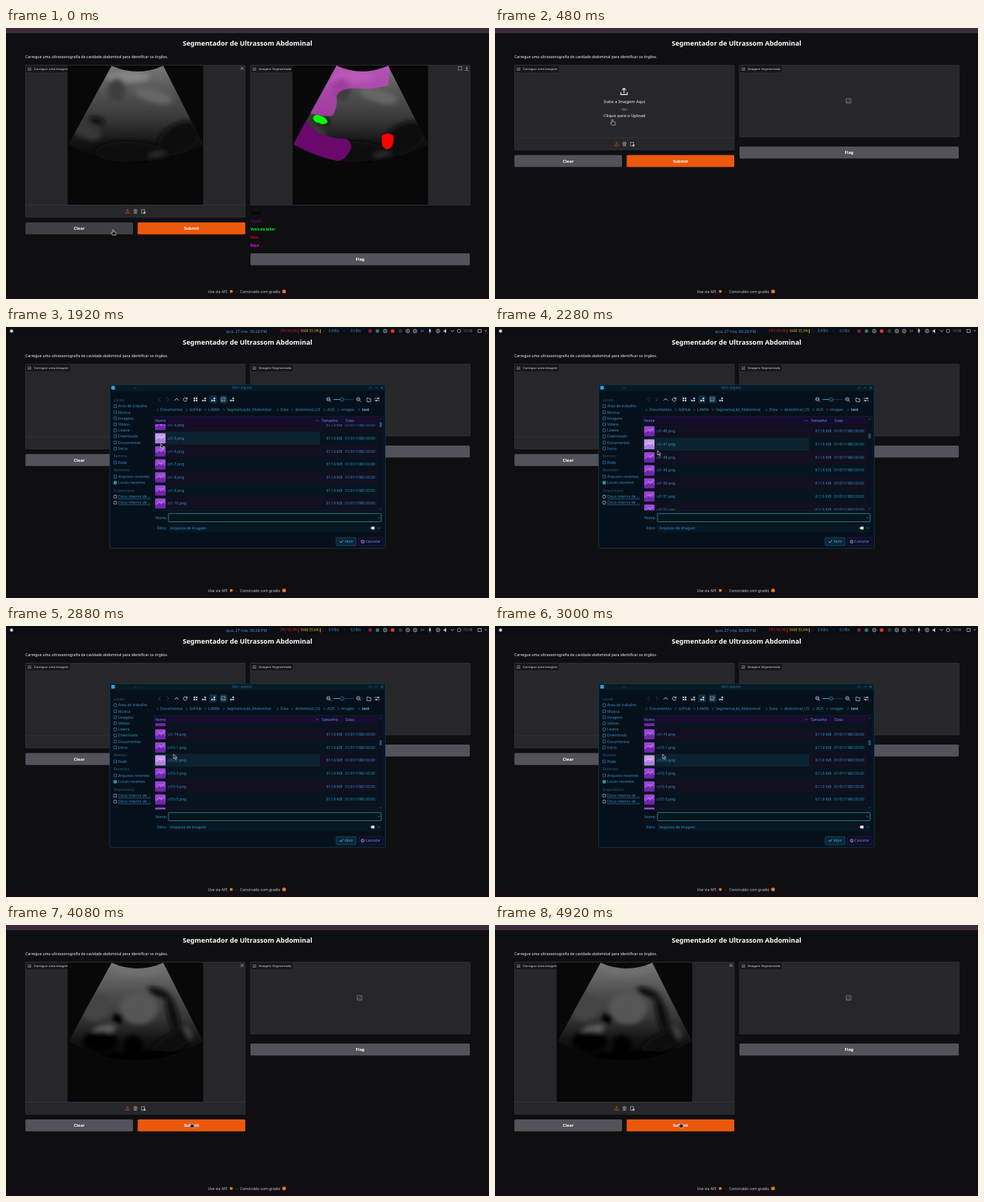
These frames come from a looping animation (654x368 px, 5.4 s). An HTML page:

```html
<!DOCTYPE html>
<html lang="pt">
<head>
<meta charset="utf-8">
<style>
html, body { margin: 0; width: 100%; height: 100%; overflow: hidden; background: #0f0f11; }
svg { display: block; width: 654px; height: 368px; font-family: "Noto Sans", "Open Sans", sans-serif; }
</style>
</head>
<body>
<svg id="stage" viewBox="0 0 654 368"></svg>
<script>
const stage = document.getElementById('stage');
const LOOP = 5400, STEP = 120, PITCH = 17.7;

// y is the middle of the capitals
const text = (x, y, s, size, fill, more = '') =>
  `<text x="${x}" y="${y + size * .36}" font-size="${size}" fill="${fill}" ${more}>${s}</text>`;
const rect = (x, y, w, h, fill, more = '') =>
  `<rect x="${x}" y="${y}" width="${w}" height="${h}" fill="${fill}" ${more}/>`;
const dot = (x, y, r, fill, more = '') => `<circle cx="${x}" cy="${y}" r="${r}" fill="${fill}" ${more}/>`;
const shape = (d, fill, more = '') => `<path d="${d}" fill="${fill}" ${more}/>`;
const line = (d, color, w = .6) =>
  `<path d="${d}" fill="none" stroke="${color}" stroke-width="${w}" stroke-linecap="round" stroke-linejoin="round"/>`;
const MID = 'text-anchor="middle"', END = 'text-anchor="end"', BOLD = 'font-weight="700"';
const lerp = (a, b, k) => a + (b - a) * k;
const clamp = k => Math.max(0, Math.min(1, k));

const FAN = 'M143 51 Q178 67 213 51 L267 158 Q176 209 84.500 158Z';
const defs = `<defs>
  <clipPath id="fan"><path d="${FAN}"/></clipPath>
  <clipPath id="list"><rect x="200" y="132" width="304" height="117"/></clipPath>
  <filter id="soft" x="-50%" y="-50%" width="200%" height="200%"><feGaussianBlur stdDeviation="3"/></filter>
  <linearGradient id="tone" x2="0" y2="1">
    <stop stop-color="#777"/><stop offset=".3" stop-color="#505050"/><stop offset=".55" stop-color="#383838"/>
    <stop offset=".8" stop-color="#121212"/><stop offset="1" stop-color="#060606"/>
  </linearGradient></defs>`;

const blob = (x, y, rx, ry, fill, turn = 0) =>
  `<ellipse cx="${x}" cy="${y}" rx="${rx}" ry="${ry}" fill="${fill}" transform="rotate(${turn} ${x} ${y})"/>`;

const SCANS = {
  first: blob(165, 66, 30, 8, '#858585') + blob(200, 92, 26, 9, '#666', 15) + blob(150, 84, 12, 16, '#3c3c3c') +
    blob(110, 140, 20, 10, '#393939', 20) + blob(123, 126, 11, 5, '#0a0a0a', 15) +
    blob(235, 150, 32, 20, '#101010', -30) + blob(165, 168, 45, 14, '#0a0a0a') + blob(205, 172, 13, 3, '#303030', -10),
  second: blob(178, 62, 32, 7, '#707070') + blob(180, 113, 26, 22, '#575757') + blob(122, 112, 20, 18, '#454545', -25) +
    blob(152, 127, 8, 7, '#050505') + blob(207, 92, 16, 6, '#0a0a0a', 20) + blob(226, 122, 7, 28, '#0a0a0a', -15) +
    blob(133, 142, 16, 6, '#606060', -10) + blob(128, 158, 24, 14, '#060606') + blob(172, 162, 13, 12, '#050505') +
    blob(225, 160, 30, 12, '#080808', -25) + blob(190, 181, 70, 10, '#040404') + blob(247, 146, 4, 10, '#444', -25)
};

const scan = (kind, extra = '') => rect(83.5, 51, 183.5, 189, '#080809') +
  `<g clip-path="url(#fan)">${shape(FAN, 'url(#tone)')}<g filter="url(#soft)">${SCANS[kind]}</g>${extra}</g>`;

const organs =
  shape('M143 48 H216 L213 78 Q194 84 176 82 Q149 80 143 92 Q145 106 138 119 Q126 121 108 116 L108 100Z', '#dc3fdc', 'opacity=".62"') +
  shape('M100 121 Q107 137 124 145 Q139 151 155 150 Q163 153 163 163 Q156 180 140 182 L80 165Z', '#6a086c') +
  shape('M111 122 Q114 116 121 119 Q130 121 131 128 Q126 133 119 129 Q113 129 111 122Z', '#0f0') +
  shape('M204 147 Q212 140 220 146 Q222 157 216 163 Q210 167 205 160Z', '#f00');

const pictureIcon = (x, y, r, c) =>
  line(`M${x - r} ${y - r} h${2 * r} v${2 * r} h${-2 * r}z m0 ${1.7 * r} l${.7 * r} ${-.7 * r} l${.8 * r} ${.7 * r}`, c, r * .25) +
  dot(x + r * .4, y - r * .4, r * .2, c);
const uploadIcon = (x, y, r, c) =>
  line(`M${x - r} ${y + r * .3} v${r * .7} h${2 * r} v${-r * .7} M${x} ${y + r * .5} v${-1.5 * r} m${-r * .55} ${r * .55} l${r * .55} ${-r * .55} l${r * .55} ${r * .55}`, c, r * .24);

const panel = (x, h, label, tab) =>
  rect(x, 50.5, 297.5, h, '#27272a', 'stroke="#3f3f46" stroke-width=".5" rx="1"') +
  rect(x, 50.5, tab, 10.5, '#18181b', 'stroke="#3f3f46" stroke-width=".5" rx="1"') +
  pictureIcon(x + 5.5, 55.7, 1.7, '#c9c9cf') + text(x + 11.3, 55.7, label, 4.32, '#e4e4e7');

const button = (x, y, w, label, fill) =>
  rect(x, y, w, 16.3, fill, 'rx="1.6"') + text(x + w / 2, y + 8.1, label, 5.76, '#fff', MID + ' font-weight="600"');

function page(left, right, clearHover) {
  const foot = left ? 240.5 : 149, base = foot + 16.5, iconY = foot + 8.5, buttonY = base + 7;
  let s = rect(0, 0, 654, 368, '#0f0f11') + rect(0, 0, 654, 7, '#3d2a3a') + rect(0, 364, 654, 4, '#190b16') +
    text(327, 21, 'Segmentador de Ultrassom Abdominal', 9.1, '#fff', MID + ' ' + BOLD) +
    text(26.3, 39.2, 'Carregue uma ultrassonografia de cavidade abdominal para identificar os órgãos.', 5.04, '#f4f4f5') +
    panel(26.5, base - 50.5, 'Carregue uma imagem', 61);
  if (left) s += scan(left) + line('M317.800 53 l3.600 3.600 m0 -3.600 l-3.600 3.600', '#ddd');
  else s += uploadIcon(174.7, 86, 4.4, '#f4f4f5') +
    text(175.3, 99.6, 'Solte a Imagem Aqui', 5.76, '#f4f4f5', MID) +
    text(175.3, 109.8, '- ou -', 5.4, '#a1a1aa', MID) +
    text(175.3, 119.3, 'Clique para o Upload', 5.76, '#f4f4f5', MID);
  s += line(`M27 ${foot} H323.500`, '#3f3f46', .5) + uploadIcon(164.7, iconY, 2.5, '#ea580c') +
    dot(175.3, iconY - .6, 2.2, 'none', 'stroke="#b4b4bb" stroke-width=".7"') + dot(175.3, iconY - .6, .9, '#b4b4bb') +
    line(`M173.500 ${iconY + 2.5} h3.600`, '#b4b4bb', .7) +
    rect(183.7, iconY - 2.3, 4, 5, 'none', 'stroke="#b4b4bb" stroke-width=".7"') + dot(187.6, iconY + 1.8, 1.5, '#b4b4bb') +
    button(26.3, buttonY, 145.7, 'Clear', clearHover ? '#3f3f46' : '#52525b') +
    button(178.3, buttonY, 145.7, 'Submit', '#ea580c') +
    panel(331, right ? 190 : 97.5, 'Imagem Segmentada', 58);
  if (right) {
    s += `<g transform="translate(304.500)">${scan(right, organs)}</g>` +
      line('M612.500 54 v-1.500 h1.500 m1.600 0 h1.500 v1.500 m0 1.600 v1.500 h-1.500 m-1.600 0 h-1.500 v-1.500 M623.800 52.500 v3 m-1.300 -1.200 l1.300 1.300 l1.300 -1.300 M621.800 57.500 h4', '#ccc');
    [['Fundo', '#000'], ['Fígado', '#56085a'], ['Vesícula biliar', '#0f0'], ['Veia', '#d00808'], ['Baço', '#f0f']]
      .forEach(([name, c], i) => s += text(331, 251 + i * 11, name, 4.8, c, BOLD));
  } else s += pictureIcon(479, 99, 3, '#85858d');
  return s + button(331, right ? 306 : 161, 297, 'Flag', '#52525b') +
    text(273.5, 357.8, 'Use via API', 5.04, '#c8c8ce') + dot(305, 357.8, 2, '#ea7a1c') +
    text(312, 357.8, '·', 5.04, '#c8c8ce') + text(317, 357.8, 'Construído com gradio', 5.04, '#c8c8ce') +
    dot(376.5, 357.8, 2.5, '#f07818');
}

function topBar(cpu, ram) {
  const c = '#c4ccd4';
  let s = rect(0, 0, 654, 11, '#0c0d12') + dot(7.5, 5.5, 2.2, c) +
    text(298, 5.6, 'qua, 27 nov, 06:28 PM', 5.4, '#3a9be0') +
    text(370.5, 5.6, `CPU ${cpu}%`, 4.7, '#d0202c') + rect(395.3, 3, .9, 5.5, '#d0202c') +
    text(399, 5.6, `RAM ${ram}%`, 4.7, '#d8b520') + rect(425, 3, .9, 5.5, '#d8b520') +
    text(429, 5.6, '↓', 4.4, '#3a9be0') + text(437, 5.6, '0.4 B/s', 4.4, '#3a9be0') +
    text(457, 5.6, '↑', 4.4, '#3a9be0') + text(466.5, 5.6, '0.0 B/s', 4.4, '#3a9be0');
  for (const [x, fill] of [[493, '#7a2030'], [503, '#287a70'], [523.5, '#e8323c'], [534, '#343840']]) s += dot(x, 5.5, 2.5, fill);
  for (const x of [513.5, 544, 554, 585]) s += dot(x, 5.5, 2.4, 'none', `stroke="${c}" stroke-width=".8"`) + dot(x, 5.5, .8, c);
  return s + text(561.5, 5.5, 'br', 5, '#3a9be0') + rect(573, 2.5, 2, 4, c, 'rx="1"') + line('M574 7 v1.500 M572 5.500 q2 3 4 0', c) +
    shape('M592.500 4.500 h1.500 l2 -2 v6 l-2 -2 h-1.500z', c) + line('M602.500 4.500 l2 2 l2 -2', c, .8) +
    dot(613.5, 5.5, 2.3, 'none', `stroke="${c}" stroke-width=".7"`) + text(619, 5.6, '10:08', 4.9, '#70767e') +
    rect(639, 3.3, 4.5, 4.2, 'none', `stroke="${c}" stroke-width=".7"`) + line('M648.500 4.500 l1 1.500 l1 -1.500', c);
}

const BLUE = '#338fc4', DIM = '#23587c', PALE = '#b7cbd8';
const PLACES = [['Locais', 99], ['Área de trabalho', 107.5], ['Música', 115.8], ['Imagens', 124], ['Vídeos', 132.2],
  ['Lixeira', 140.4], ['Downloads', 148.6], ['Documentos', 156.8], ['Início', 165], ['Remoto', 175.3], ['Rede', 184],
  ['Recentes', 194.5], ['Arquivos recentes', 203], ['Locais recentes', 211.5], ['Dispositivos', 222],
  ['Disco interno de ...', 230.3], ['Disco interno de ...', 238.5]];
const HEADINGS = ['Locais', 'Remoto', 'Recentes', 'Dispositivos'];
const CRUMBS = [['Documentos', 209], ['GitHub', 248.5], ['LAMIA', 274], ['Segmentação_Abdominal', 299], ['Data', 371.5],
  ['abdominal_US', 391.5], ['AUS', 435], ['images', 454], ['test', 482]];

function fileRows(scroll, cursorY) {
  const top = 80.2 - scroll, first = Math.floor((132 - top) / PITCH), hover = Math.round((cursorY - top) / PITCH);
  let s = '';
  for (let i = first; i < first + 9; i++) {
    const y = top + i * PITCH, name = i < 74 ? `ct1-${i + 1}` : `ct10-${i - 73}`, on = i === hover;
    s += rect(200, y - PITCH / 2, 304, PITCH, i % 2 ? '#110f20' : '#07131d') +
      (on ? rect(200, y - PITCH / 2, 225, PITCH, '#0d2230') : '') +
      rect(202, y - 6.8, 14, 13.6, on ? '#c79be8' : '#9a45d6', 'rx=".8"') +
      shape(`M202 ${y + 6.8} v-4 l4 -4 l4 3 l3 -2 l3 3 v4z`, on ? '#b47ce0' : '#6f25ad') +
      line(`M204 ${y + 1.5} l4 -4 l2 2 l4 -3`, on ? '#ead8fa' : '#d29af5', .8) +
      text(219, y, name + '.png', 5.04, BLUE) + text(455.5, y, '611,9 KiB', 5.04, BLUE, END) +
      text(459, y, '01/01/1980 00:00', 5.04, BLUE);
  }
  return `<g clip-path="url(#list)">${s}</g>`;
}

function dialog(k, cursorY) {
  let s = rect(140.5, 78.5, 373, 222, '#06101a', 'stroke="#0c3a50" stroke-width=".8" rx="1.500"') +
    rect(141, 79, 372, 8, '#071a26') + rect(142.5, 80, 5, 5, '#2f9fe0', 'rx="1"') +
    text(319.5, 82.3, 'Abrir arquivo', 4.4, '#2f6f92', MID) +
    line('M173 84 l2 -2 l2 2', DIM) +
    line('M491.500 83.200 l1.700 -1.700 l1.700 1.700 M499.500 83.200 l1.700 -1.700 l1.700 1.700 M507.500 81 l3 3 m0 -3 l-3 3', BLUE) +
    line('M209 96 l-2.500 2.500 l2.500 2.500 M218 96 l2.500 2.500 l-2.500 2.500', '#3a4854', .8) +
    line('M228.500 99.500 l2.500 -2.500 l2.500 2.500 M245 97.500 a2.500 2.500 0 1 0 0 2 m.2 -3.500 v1.700 h-1.700', PALE, .9);
  for (const x of [276, 290]) s += rect(x, 93.5, 9, 9.5, '#0c2c40', 'stroke="#15506c" stroke-width=".5" rx="1"');
  for (const x of [254, 265.5, 278, 303.5])
    for (const [dx, dy] of [[0, 0], [3, 0], [0, 3], [3, 3]])
      if (x < 260 || dx !== dy || dx) s += rect(x + dx, 95.8 + dy, 2.2, 2.2, PALE);
  s += pictureIcon(294.5, 98.3, 2.4, PALE);
  for (const x of [436.5, 477]) s += dot(x, 98, 2.3, 'none', `stroke="${PALE}" stroke-width=".8"`) +
    line(`M${x + 1.8} 99.800 l1.500 1.500 M${x - 1} 98 h2`, PALE, .8);
  s += line('M444 98.500 H470', '#173a4c', 1.2) + line('M444 98.500 H455', '#2f9fe0', 1.2) +
    dot(455, 98.5, 2.6, '#0a1c2c', 'stroke="#2c7fb0" stroke-width=".7"') +
    line('M488.800 101 v-4.500 h2 l.8 1 h2.400 v3.500z M499.500 97 h6 M499.500 100 h6', PALE, .8) + dot(504, 97, 1, PALE) + dot(501.5, 100, 1, PALE);

  for (const [name, y] of PLACES) {
    const head = HEADINGS.includes(name), disk = name.startsWith('Disco');
    s += text(head ? 145.5 : 152, y, name, 5.04, head ? DIM : BLUE, disk ? 'text-decoration="underline"' : '');
    if (!head) s += rect(146, y - 1.9, 3.7, 3.8, name === 'Locais recentes' ? '#26a08a' : 'none', `stroke="${disk ? PALE : BLUE}" stroke-width=".7" rx=".6"`);
  }
  for (const [name, x] of CRUMBS) s += text(x, 112.4, name, 5.04, name === 'test' ? '#62b8ea' : BLUE, name === 'test' ? BOLD : '') +
    line(`M${x - 4.5} 111 l1.400 1.400 l-1.400 1.400`, BLUE);

  s += rect(200, 121.5, 311, 128, '#07131d', 'stroke="#0d2c40" stroke-width=".5"') + fileRows(k * 1225.3, cursorY) +
    rect(200, 122, 304, 10, '#170b2e') + text(202, 127, 'Nome', 5.04, '#4aa3d8') +
    line('M420 127.800 l1.500 -1.500 l1.500 1.500', BLUE) + text(427.5, 127, 'Tamanho', 5.04, '#4aa3d8') + text(460, 127, 'Data', 5.04, '#4aa3d8') +
    rect(504, 122, 6.5, 127, '#0a1020') + rect(505.6, lerp(129, 155, k), 3.2, 7, '#1c5576', 'rx="1"') +
    line('M506 125.500 l1.200 -1.200 l1.200 1.200 M506 246.200 l1.200 1.200 l1.200 -1.200', BLUE, .5) +
    text(218, 259, 'Nome:', 5.04, BLUE, END) +
    rect(220, 253.3, 288, 11.2, '#06141c', 'stroke="#2f9aa8" stroke-width=".8" rx="1"') +
    text(218, 273, 'Filtro:', 5.04, BLUE, END) +
    rect(220, 267.5, 288, 11, '#081724', 'rx="1"') + text(222.5, 273, 'Arquivos de imagem', 5.04, BLUE) +
    shape('M493.500 273 l2 -2 h3.500 v4 h-3.500z', '#dce6ec') +
    line('M503.500 258.400 l1.400 1.400 l1.400 -1.400 M503.500 272.400 l1.400 1.400 l1.400 -1.400', BLUE) +
    rect(447, 286, 27, 11, '#0a2638', 'stroke="#1c5f80" stroke-width=".6" rx="1"') +
    line('M452 291.500 l1.400 1.500 l2.600 -3', PALE, .8) + text(458.5, 291.5, 'Abrir', 5.04, '#4aa3d8') +
    rect(477.5, 286, 33, 11, '#120b28', 'stroke="#30205c" stroke-width=".6" rx="1"') +
    dot(483, 291.5, 2, 'none', `stroke="${PALE}" stroke-width=".7"`) + line('M481.700 290.200 l2.600 2.600', PALE) +
    text(486.5, 291.5, 'Cancelar', 5.04, '#4aa3d8');
  return s;
}

const ARROW = 'M0 0 V6.200 L1.500 4.900 L2.600 7.300 L3.700 6.800 L2.600 4.500 H4.500Z';
const HAND = 'M-.8 .8 Q0 -.6 .8 .8 V3 L3.600 3.700 Q4.200 4 4 5 L3.400 7.800 H-.6 L-2.900 4.900 Q-2.500 3.900 -.8 4.900Z';
const pointer = (x, y, hand) => `<g transform="translate(${x} ${y})">` +
  shape(hand ? HAND : ARROW, '#1c1c20', 'stroke="#d4d4d8" stroke-width=".7"') + '</g>';

function draw(t) {
  const resultShown = t < 480, open = t >= 960 && t < 3120, uploaded = t >= 3120;
  const k = t >= 2880 ? 1 : clamp((Math.min(t, 2400) - 1920) / 600);
  const go = clamp((t - 3720) / 360);
  const [x, y] = resultShown ? [145, 273.5] : t < 960 ? [159, 124] :
    open ? [lerp(209.5, 227, k), lerp(158.5, 174, k)] : [lerp(232.5, 251, go), lerp(179.5, 267.5, go)];
  let s = defs + page(resultShown ? 'first' : uploaded ? 'second' : '', resultShown ? 'first' : '', resultShown);
  if (open) s += topBar(...(t < 1920 ? ['90,0', '53,3'] : t < 2880 ? ['95,0', '53,3'] : ['90,3', '53,6'])) + dialog(k, y);
  stage.innerHTML = s + pointer(x, y, t < 960 || go === 1);
}

let shown = -1;
function tick() {
  const t = Math.floor(performance.now() % LOOP / STEP) * STEP;
  if (t !== shown) draw(shown = t);
  requestAnimationFrame(tick);
}
tick();
</script>
</body>
</html>
```
